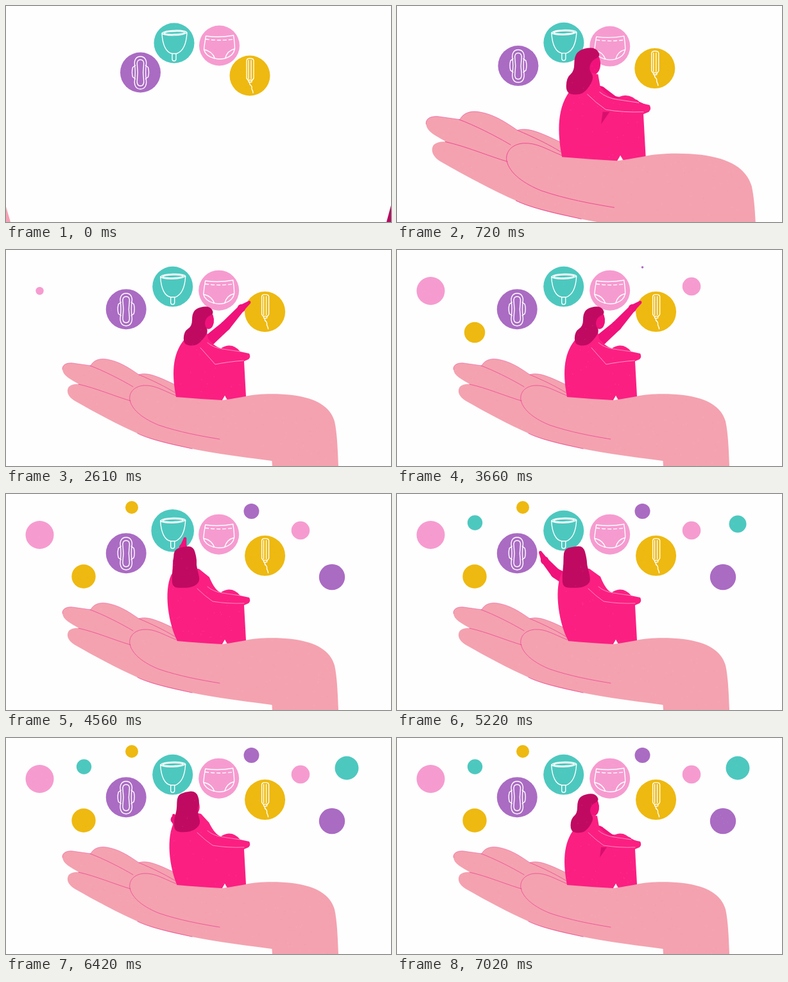
Write an HTML page with a canvas that moves like this. It is 600x338 px and loops after 7.11 s.

```html
<!DOCTYPE html>
<html lang="en">
<head>
<meta charset="utf-8">
<style>
html, body { margin: 0; width: 100%; height: 100%; overflow: hidden; background: #fefefe; }
canvas { display: block; width: 600px; height: 338px; }
</style>
</head>
<body>
<canvas id="stage" width="600" height="338"></canvas>
<script>
const ctx = document.getElementById('stage').getContext('2d');
const LOOP = 7110;
const C = {
  skin: '#f4a2b0', line: '#ee3f90', body: '#fb1f82', arm: '#f0127a', hair: '#c00a62', shade: '#d80f6e',
  purple: '#aa6bc3', teal: '#4dc8bf', pink: '#f69bd0', yellow: '#eeb910', thin: '#ffa6cb'
};

const clamp = v => Math.max(0, Math.min(1, v));
const mix = (a, b, k) => a + (b - a) * k;
const mixPts = (a, b, k) => a.map((p, i) => [mix(p[0], b[i][0], k), mix(p[1], b[i][1], k)]);
const prog = (t, from, len) => clamp((t - from) / len);
const outCubic = k => 1 - (1 - k) ** 3;
const inOut = k => k < .5 ? 4 * k ** 3 : 1 - (2 - 2 * k) ** 3 / 2;
const outBack = k => 1 + 2.2 * (k - 1) ** 3 + 1.2 * (k - 1) ** 2;

function fill(path, color) { ctx.fillStyle = color; ctx.fill(new Path2D(path)); }
function stroke(path, color, width) {
  ctx.strokeStyle = color;
  ctx.lineWidth = width;
  ctx.stroke(new Path2D(path));
}
function disc(x, y, r, color) {
  ctx.fillStyle = color;
  ctx.beginPath();
  ctx.arc(x, y, Math.max(0, r), 0, 7);
  ctx.fill();
}
// Closed smooth shape through the midpoints of its corners
function blob(pts, color) {
  const n = pts.length;
  ctx.beginPath();
  for (let i = 0; i <= n; i++) {
    const a = pts[i % n], b = pts[(i + 1) % n];
    const mx = (a[0] + b[0]) / 2, my = (a[1] + b[1]) / 2;
    if (i) ctx.quadraticCurveTo(a[0], a[1], mx, my);
    else ctx.moveTo(mx, my);
  }
  ctx.fillStyle = color;
  ctx.fill();
}
function limb(pts, radii, color) {
  pts.forEach((p, i) => {
    disc(p[0], p[1], radii[i], color);
    if (!i) return;
    const q = pts[i - 1], a = Math.atan2(p[1] - q[1], p[0] - q[0]) + Math.PI / 2;
    const c = Math.cos(a), s = Math.sin(a), r = radii[i - 1], e = radii[i];
    ctx.beginPath();
    ctx.moveTo(q[0] + c * r, q[1] + s * r);
    ctx.lineTo(p[0] + c * e, p[1] + s * e);
    ctx.lineTo(p[0] - c * e, p[1] - s * e);
    ctx.lineTo(q[0] - c * r, q[1] - s * r);
    ctx.fill();
  });
}

const icons = {
  pad: `M0-25C7-25 10-19 9-12C8-5 8 4 9 12C10 20 7 26 0 26C-7 26-10 20-9 12C-8 4-8-5-9-12C-10-19-7-25 0-25Z
    M0-20C4-20 6-17 5-11C4-4 4 4 5 11C6 18 4 21 0 21C-4 21-6 18-5 11C-4 4-4-4-5-11C-6-17-4-20 0-20Z
    M-8-11L-12-8Q-14 0-12 7L-8 10M8-11L12-8Q14 0 12 7L8 10`,
  cup: `M-19-15.5A20 5 -2 0 1 20-16.5A20 5 -2 0 1-19-15.5ZM-16-15.5A17 3 -2 0 1 17-16.5A17 3 -2 0 1-16-15.5Z
    M-19-15C-18 4-12 15-3 16.5H4C14 13 19 2 20-16M-3 16.5V25Q-3 28 0 28Q3 28 3 25V16.5`,
  pants: `M-21-15Q0-12 22-16Q24-4 24 5Q12 8 9 20Q0 22-7 20Q-11 9-24 6Q-23-4-21-15Z
    M-24 6Q-22 16-8 20M24 5Q22 16 9 20`,
  dash: 'M-21-10Q0-7 23-10',
  tampon: `M-4-26Q0-28 5-26L6-24V4L4 7H-3L-5 4V-24ZM-2-24V5M2-24V5M-2 7V10H3V7
    M0 10C-2 16 4 14 3 19C2 22 5 22 5 27`
};

// from, to, press time of each product badge
const badges = [
  { icon: 'pad', color: C.purple, from: [209.5, 104], to: [187.2, 92.7], press: 5820 },
  { icon: 'cup', color: C.teal, from: [262, 58], to: [259.7, 57.3], press: 4560 },
  { icon: 'pants', color: C.pink, from: [332.5, 62], to: [331.7, 63.2], press: 1410 },
  { icon: 'tampon', color: C.yellow, from: [380, 109], to: [403.6, 96.6], press: 2250 }
];
function drawBadge(b, t) {
  const k = outCubic(prog(t, 60, 1150));
  const pulse = Math.exp(-(((t - b.press) / 200) ** 2));
  ctx.save();
  ctx.translate(mix(b.from[0], b.to[0], k), mix(b.from[1], b.to[1], k));
  disc(0, 0, 31.5 + 1.8 * pulse, b.color);
  stroke(icons[b.icon], '#fff', 1.4);
  if (b.icon === 'pants') {
    ctx.setLineDash([5, 4]);
    stroke(icons.dash, '#fff', 1.4);
  }
  ctx.restore();
}

// x, y, radius, colour, start
const dots = [
  [52.5, 64, 22, C.pink, 2580], [459, 57, 14.3, C.pink, 3050],
  [121, 129, 18.7, C.yellow, 3525], [382.5, 27, 12, C.purple, 3645],
  [196, 21, 10, C.yellow, 3880], [508, 130, 20.2, C.purple, 4030],
  [121.5, 45, 11.7, C.teal, 4720], [531, 47, 18.5, C.teal, 5120]
];

function drawHand() {
  fill(`M88 187C87 180 94 176 104 177L132 181C136 173 145 169 157 171C176 174 191 184 207 195
    C220 191 235 197 264 211L268 229L372 229C390 225 420 224 446 227C484 232 505 245 512 268
    C516 286 517 312 518 338H415L414.5 330C360 323 310 316 265 306C235 299 216 293 205 287
    C176 274 140 255 107 236C97 230 93 221 98 214Q104 209 114 210C100 202 89 197 88 187Z`, C.skin);
  stroke('M131 181C150 188 178 202 198 214M207 195C228 204 247 213 263 223', C.line, .75);
  stroke('M113 210C140 216 170 229 194 236M205 287C225 297 260 304 290 311', C.line, .75);
  stroke('M265 228C245 220 232 211 215 212C200 213 191 223 193 235C197 252 216 265 238 274C270 285 303 291 333 296', C.line, .75);
  stroke('M88 187C87 180 94 176 104 177L132 181C136 173 145 169 157 171C176 174 191 184 207 195C220 191 235 197 264 211', C.line, .5);
}

// Arm joints: shoulder, elbow, wrist, fingertip; turn is 0 from the side, 1 from behind
const poses = {
  rest: { turn: 0, lean: 0, arm: [[314, 146], [332, 158], [360, 161], [376, 165]] },
  pants: { turn: 0, lean: 0, arm: [[325, 139], [329, 116], [332, 91], [337, 74]] },
  tampon: { turn: 0, lean: 9, arm: [[318, 140], [342, 119], [367, 91], [379, 82]] },
  cup: { turn: .9, lean: 0, arm: [[268, 128], [268, 104], [276, 84], [279, 70]] },
  pad: { turn: 1, lean: 0, arm: [[260, 134], [240, 131], [214, 111], [204, 99]] }
};
const moves = [
  ['pants', 880, 480], ['tampon', 1950, 550], ['cup', 3850, 600],
  ['pad', 4850, 620], ['rest', 6150, 620]
];
function poseAt(t) {
  let p = poses.rest;
  for (const [name, start, len] of moves) {
    const q = poses[name], k = inOut(prog(t, start, len));
    p = { turn: mix(p.turn, q.turn, k), lean: mix(p.lean, q.lean, k), arm: mixPts(p.arm, q.arm, k) };
  }
  return p;
}

const hairSide = [[289, 89], [308, 86], [316, 98], [303, 104], [300, 116], [307, 126],
  [298, 142], [288, 149], [270, 147], [271, 126], [281, 118], [281, 98]];
const hairBack = [[274, 82], [290, 81], [295, 100], [296, 112], [299, 122], [302, 138],
  [291, 146], [275, 147], [258, 146], [257, 128], [259, 110], [259, 86]];
const torsoSide = [[300, 119], [280, 138], [261, 158], [257, 188], [265, 230], [312, 122], [315, 139]];
const torsoBack = [[280, 112], [257, 122], [245, 142], [249, 195], [267, 230], [300, 117], [317, 129]];

function drawWoman(t) {
  const p = poseAt(t), k = p.turn;
  const [neck, back, b, c, d, chin, chest] = mixPts(torsoSide, torsoBack, k).map(q => q.join(' '));
  limb(p.arm, [9, 7.8, 5.4, 2.4], C.arm);
  disc(...p.arm[2], 6.2, C.arm);
  // Head sits behind the hair
  ctx.save();
  ctx.translate(p.lean, p.lean / 5);
  ctx.fillStyle = C.arm;
  ctx.beginPath();
  ctx.ellipse(mix(305.5, 282, k), 107, mix(9.5, 13, k), 15, -.1, 0, 7);
  ctx.fill();
  ctx.restore();
  fill(`M${neck}L${back}C${b} ${c} ${d}Q300 233 337 235L341 228L345 234L374 229
    L371 174L378 171Q382 167 379 162L365 159Q357 149 347 149.5Q340 150 335 154Q326 152 ${chest}L${chin}Z`, C.body);
  fill('M341 228L337 235L344 234Z', '#fefefe');
  stroke('M314 145Q323 153 338 155L365 159', C.thin, .8);
  ctx.globalAlpha = clamp(p.lean / 9);
  stroke('M303 153L326 179Q345 175 370 173', C.thin, .9);
  const upright = 1 - ctx.globalAlpha;
  ctx.globalAlpha = upright;
  stroke('M298 148Q309 159 322 168Q345 172 371 171', C.thin, .8);
  ctx.globalAlpha = upright * clamp(1 - 2 * k);
  fill('M316 187L318 171L327 171Z', C.shade);
  ctx.globalAlpha = 1;
  const hair = mixPts(hairSide, hairBack, k);
  blob(hair.map((q, i) => [q[0] + p.lean * (i > 5 && i < 10 ? .7 : 1), q[1] + p.lean / 7]), C.hair);
}

function drawScene(t) {
  const rise = 340 * (1 - outCubic(prog(t, 60, 740)));
  const zoom = 1 + Math.min(.6, .12 * Math.exp((810 - t) / 180));
  ctx.save();
  ctx.translate(305, 200 + rise);
  ctx.scale(zoom, zoom);
  ctx.translate(-305, -200);
  drawHand();
  drawWoman(t);
  ctx.restore();
}

// Faint printed texture, kept inside the coloured shapes
function drawGrain(t) {
  let seed = 77 + Math.floor(t / 90) * 7919;
  const rnd = () => (seed = (seed * 16807) % 2147483647) / 2147483647;
  ctx.globalCompositeOperation = 'source-atop';
  for (let i = 0; i < 900; i++) {
    ctx.fillStyle = i % 2 ? 'rgba(255,255,255,.13)' : 'rgba(120,30,60,.06)';
    ctx.fillRect(rnd() * 600, rnd() * 338, 1, 1);
  }
  ctx.globalCompositeOperation = 'source-over';
}

function draw(t) {
  ctx.clearRect(0, 0, 600, 338);
  ctx.lineCap = ctx.lineJoin = 'round';
  if (t < 60) {
    fill('M0 314L7 338H0Z', '#f6a0b4');
    fill('M600 312L593 338H600Z', '#b9085f');
  }
  for (const [x, y, r, color, start] of dots) {
    const k = prog(t, start, 420);
    if (k > 0) disc(x, y, r * outBack(k), color);
  }
  badges.forEach(b => drawBadge(b, t));
  if (t >= 60) drawScene(t);
  drawGrain(t);
}

const begin = performance.now();
function tick() {
  draw((performance.now() - begin) % LOOP);
  requestAnimationFrame(tick);
}
tick();
</script>
</body>
</html>
```
